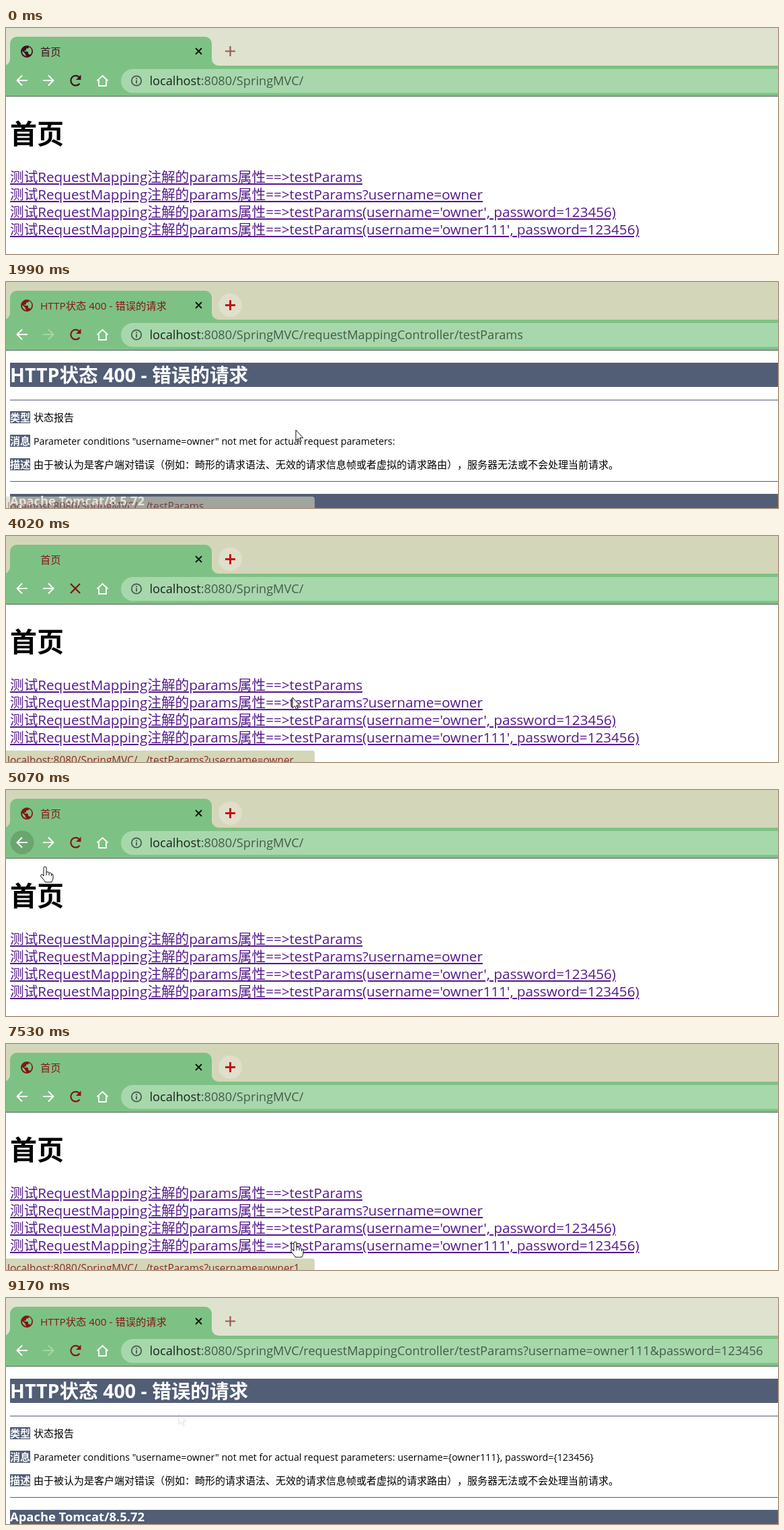
Recreate the animation shown at these times as an HTML page. Size 1148x336 px, loop 9.23 s.

```html
<!DOCTYPE html>
<html lang="zh-CN">
<head>
<meta charset="utf-8">
<title>RequestMapping params</title>
<style>
html, body { margin: 0; height: 100%; overflow: hidden; background: #fff; }
svg { display: block; width: 100vw; height: 100vh; }
text {
  font-family: "Open Sans", "Noto Sans CJK SC", "Noto Sans CJK", sans-serif;
  white-space: pre; text-spacing-trim: space-all;
}
.line { fill: none; stroke-width: 1.9; }
.white { stroke: #fff; }
.title { font-size: 15.3px; fill: currentColor; }
.url { font-size: 18.2px; fill: #46594b; }
.url tspan { fill: #1c211d; }
.head { font-size: 40.3px; font-weight: 700; }
.links text {
  font-size: 20.65px; fill: #551a8b;
  text-decoration: underline; text-decoration-thickness: 2px;
}
.slate { fill: #525d76; }
.h1 { font-size: 28.6px; font-weight: 700; fill: #fff; }
.label { font-size: 15px; font-weight: 700; fill: #fff; }
.cjk { font-size: 15px; }
.msg { font-size: 14.25px; }
.foot { font-size: 18.4px; font-weight: 700; fill: #fff; }
.bubble text { font-size: 15.4px; fill: #8a2a20; }

/* Everything shares one 9.23 s loop; groups are switched hard */
.sw, .tint { animation: 9.23s step-end infinite; }
.sw { opacity: 0; }
.home { animation-name: home; }
.err { animation-name: err; }
.ok { animation-name: ok; }
.u1 { animation-name: u1; }
.u2 { animation-name: u2; }
.u3 { animation-name: u3; }
.u4 { animation-name: u4; }
.s1 { animation-name: s1; }
.s2 { animation-name: s2; }
.s3 { animation-name: s3; }
.s4 { animation-name: s4; }
.focus { animation-name: focus; }
.blur { animation-name: blur; }
.idle { animation-name: idle; }
.load { animation-name: load; }
.hover { animation-name: hover; }
.arrow { animation-name: arrow; }
.hand { animation-name: hand; }
.seen { animation-name: seen; }
.strip { animation-name: strip; }
.ink { animation-name: ink; }
.cursor { animation: move 9.23s ease-in-out infinite; }

@keyframes home {
  0%, 32.07%, 53.52%, 72.81% { opacity: 1; }
  19.72%, 44.31%, 63.49%, 86.24%, 100% { opacity: 0; }
}
@keyframes err { 19.72%, 86.24%, 100% { opacity: 1; } 0%, 32.07% { opacity: 0; } }
@keyframes ok { 44.31%, 63.49% { opacity: 1; } 53.52%, 72.81% { opacity: 0; } }
@keyframes u1 { 19.72% { opacity: 1; } 32.07% { opacity: 0; } }
@keyframes u2 { 44.31% { opacity: 1; } 53.52% { opacity: 0; } }
@keyframes u3 { 63.49% { opacity: 1; } 72.81% { opacity: 0; } }
@keyframes u4 { 86.24%, 100% { opacity: 1; } }
@keyframes s1 { 9.75% { opacity: 1; } 21.02% { opacity: .6; } 22.32% { opacity: 0; } }
@keyframes s2 { 39% { opacity: 1; } 45.4% { opacity: .6; } 46.15% { opacity: 0; } }
@keyframes s3 { 59.59% { opacity: 1; } 64.9% { opacity: .6; } 65.66% { opacity: 0; } }
@keyframes s4 { 80.39% { opacity: 1; } 87.76% { opacity: .6; } 89.06% { opacity: 0; } }
@keyframes focus { 18.74% { opacity: 1; } 99.35% { opacity: 0; } }
@keyframes blur { 0%, 99.35%, 100% { opacity: 1; } 18.74% { opacity: 0; } }
@keyframes idle {
  0%, 19.72%, 44.31%, 63.49%, 86.24%, 100% { opacity: 1; }
  18.74%, 42.9%, 62.6%, 85.2% { opacity: 0; }
}
@keyframes load {
  18.74%, 42.9%, 62.6%, 85.2% { opacity: 1; }
  19.72%, 44.31%, 63.49%, 86.24% { opacity: 0; }
}
@keyframes hover {
  29.9%, 51.35%, 70.86% { opacity: 1; }
  35.1%, 56.34%, 75.84% { opacity: 0; }
}
@keyframes hand {
  9.75%, 39%, 53.9%, 59.59%, 80.39% { opacity: 1; }
  18.74%, 42.9%, 57.2%, 62.6%, 85.2% { opacity: 0; }
}
@keyframes arrow {
  0%, 18.74%, 42.9%, 57.2%, 62.6%, 85.2%, 100% { opacity: 1; }
  9.75%, 39%, 53.9%, 59.59%, 80.39% { opacity: 0; }
}
@keyframes seen { 3.03%, 90.57% { opacity: 1; } 87.76%, 92.5% { opacity: 0; } }
@keyframes strip { 0%, 99.35%, 100% { fill: #dfe2cf; } 18.74% { fill: #d4d6ba; } }
@keyframes ink { 0% { color: #40101f; } 18.74%, 100% { color: #82161a; } }
@keyframes move {
  0%, 3.03% { transform: translate(853px, 325px); }
  12.78%, 15.71% { transform: translate(441px, 218px); }
  17%, 26.1% { transform: translate(431px, 220px); }
  30.9%, 35.1% { transform: translate(24px, 82px); }
  41.2%, 47.35% { transform: translate(426px, 240px); }
  52%, 53.74% { transform: translate(24px, 80px); }
  54.85%, 57.2% { transform: translate(58px, 114px); }
  57.96% { transform: translate(378px, 282px); }
  59.48%, 65.2% { transform: translate(433px, 270px); }
  68.15%, 69.7% { transform: translate(26px, 107px); }
  71.07%, 74.76% { transform: translate(24px, 82px); }
  80.4%, 87.3% { transform: translate(430px, 294px); }
  88.5%, 90.57% { transform: translate(257px, 172px); }
  92.1%, 100% { transform: translate(853px, 325px); }
}
</style>
</head>
<body>
<svg viewBox="0 0 1148 336" preserveAspectRatio="none">
  <defs>
    <path id="pointer" d="M0 0V16L3.6 12.6L6 18L8.2 17L5.900 11.800H10.800Z" fill="#fff" stroke="#111"/>
    <path id="bubble" d="M0 319H455Q459 319 459 323V340H0Z" fill="#d4d6ba"/>
    <path id="left" class="line" d="M8 0H-7M0-7.5L-7.5 0L0 7.5"/>
    <path id="cross" d="M-7-7L7 7M7-7L-7 7"/>
  </defs>

  <!-- Tab strip and toolbar -->
  <rect class="tint strip" width="1148" height="56" fill="#dfe2cf"/>
  <path d="M0 56H1148V101H0Z M-4 56A10 10 0 0 0 6 46V23A10 10 0 0 1 16 13H296A10 10 0 0 1 306 23V46A10 10 0 0 0 316 56Z" fill="#7dc284"/>
  <rect y="101" width="1148" height="1" fill="#58685b"/>
  <path d="M282 30L291 39M291 30L282 39" stroke="#111" stroke-width="1.9"/>
  <g class="sw blur"><path d="M326 34.5H341M333.5 27V42" stroke="#955a50" stroke-width="2.2"/></g>
  <g class="sw focus">
    <circle cx="333.5" cy="34.5" r="17.5" fill="#dfdfcb"/>
    <path d="M326 34.5H341M333.5 27V42" stroke="#c01418" stroke-width="3"/>
  </g>

  <g class="tint ink">
    <g class="sw idle">
      <circle cx="31" cy="35" r="9" fill="currentColor"/>
      <path d="M30 42Q23.5 40 24.200 34L28.500 38V39.500L30 41Z M36 40Q35.500 38.500 33 38.500V36L32 35H27.500V33.500H30V30.500H32Q34 30 34 28.200Q38.500 30 38.300 35Q38 38 36 40Z" fill="#7dc284"/>
    </g>
    <g class="sw idle">
      <path class="line" d="M109.500 82.500A7.300 7.300 0 1 1 108.800 73" stroke="currentColor" style="stroke-width:2.2"/>
      <path d="M111.500 69.500V77H104Z" fill="currentColor"/>
    </g>
    <text class="title sw home" x="51" y="41">首页</text>
    <text class="title sw err" x="51" y="41">HTTP状态 400 - 错误的请求</text>
    <text class="title sw ok" x="51" y="41">Success</text>
  </g>

  <circle class="sw hover" cx="24" cy="78" r="17.5" fill="#6aa570"/>
  <use href="#left" x="24" y="78" class="white"/>
  <use href="#left" transform="translate(63 78) scale(-1 1)" stroke="#a6d6aa"/>
  <g class="sw home"><use href="#left" transform="translate(63 78) scale(-1 1)" class="white"/></g>
  <g class="sw load"><use href="#cross" x="103" y="78" stroke="#7a1414" stroke-width="2.2"/></g>
  <path class="line white" d="M135.500 78.500L143.500 71L151.500 78.500M138 77V86H149V77"/>

  <rect x="171" y="61" width="1010" height="35.500" rx="17.750" fill="#a7d8ab"/>
  <circle class="line" cx="194" cy="78.500" r="7.200" stroke="#46594b" style="stroke-width:1.7"/>
  <path d="M194 77.500V82.500M194 74.300V76.200" stroke="#46594b" stroke-width="1.800"/>
  <text class="url sw home" x="213.500" y="85"><tspan>localhost</tspan>:8080/SpringMVC/</text>
  <text class="url sw u1" x="213.500" y="85"><tspan>localhost</tspan>:8080/SpringMVC/requestMappingController/testParams</text>
  <text class="url sw u2" x="213.500" y="85"><tspan>localhost</tspan>:8080/SpringMVC/requestMappingController/testParams?username=owner</text>
  <text class="url sw u3" x="213.500" y="85"><tspan>localhost</tspan>:8080/SpringMVC/requestMappingController/testParams?username=owner&amp;password=123456</text>
  <text class="url sw u4" x="213.500" y="85"><tspan>localhost</tspan>:8080/SpringMVC/requestMappingController/testParams?username=owner111&amp;password=123456</text>

  <!-- Pages -->
  <g class="sw home">
    <text class="head" x="6" y="172" style="font-size:40px">首页</text>
    <g class="links">
      <text x="6" y="229">测试RequestMapping注解的params属性==&gt;testParams</text>
      <text x="6" y="255">测试RequestMapping注解的params属性==&gt;testParams?username=owner</text>
      <text x="6" y="281">测试RequestMapping注解的params属性==&gt;testParams(username='owner', password=123456)</text>
      <text x="6" y="307">测试RequestMapping注解的params属性==&gt;testParams(username='owner111', password=123456)</text>
    </g>
  </g>

  <text class="head sw ok" x="6" y="171">Success</text>

  <g class="sw err">
    <path class="slate" d="M6 120H1148V156H6Z M6 175H1148V176H6Z M6 296H1148V297H6Z M6 315H1148V336H6Z M6 192H36V210H6Z M6 227H36V245H6Z M6 262H36V280H6Z"/>
    <text class="h1" x="6" y="149">HTTP状态 400 - 错误的请求</text>
    <text class="label" x="6" y="207">类型</text>
    <text class="label" x="6" y="242">消息</text>
    <text class="label" x="6" y="277">描述</text>
    <text class="cjk" x="41" y="207">状态报告</text>
    <text class="msg sw u1" x="41" y="242">Parameter conditions "username=owner" not met for actual request parameters:</text>
    <text class="msg sw u4" x="41" y="242">Parameter conditions "username=owner" not met for actual request parameters: username={owner111}, password={123456}</text>
    <text class="cjk" x="41" y="277">由于被认为是客户端对错误（例如：畸形的请求语法、无效的请求信息帧或者虚拟的请求路由），服务器无法或不会处理当前请求。</text>
    <text class="foot" x="6" y="332">Apache Tomcat/8.5.72</text>
  </g>

  <!-- Link status -->
  <g class="bubble">
    <g class="sw s1"><use href="#bubble"/><text x="2" y="339">localhost:8080/SpringMVC/.../testParams</text></g>
    <g class="sw s2"><use href="#bubble"/><text x="2" y="339">localhost:8080/SpringMVC/.../testParams?username=owner</text></g>
    <g class="sw s3"><use href="#bubble"/><text x="2" y="339">localhost:8080/SpringMVC/.../testParams?username=owner...</text></g>
    <g class="sw s4"><use href="#bubble"/><text x="2" y="339">localhost:8080/SpringMVC/.../testParams?username=owner1...</text></g>
  </g>

  <!-- Mouse -->
  <g class="sw u4"><use href="#pointer" x="257" y="172" opacity=".13"/></g>
  <g class="sw seen">
    <g class="cursor">
      <g class="sw arrow"><use href="#pointer"/></g>
      <g class="sw hand">
        <path d="M-2 14V2Q-2 0 0 0T2 2V8Q6 7 6 9.500Q9 8 9.500 11Q12 10 12 13V17Q12 20 10 22V23H0V22L-6 14.500Q-7 12-5 11.500T-2 14Z" fill="#fff" stroke="#111"/>
        <path d="M2 8V13M6 9.500V13M9.500 11V14" stroke="#111"/>
      </g>
    </g>
  </g>
</svg>
</body>
</html>
```
